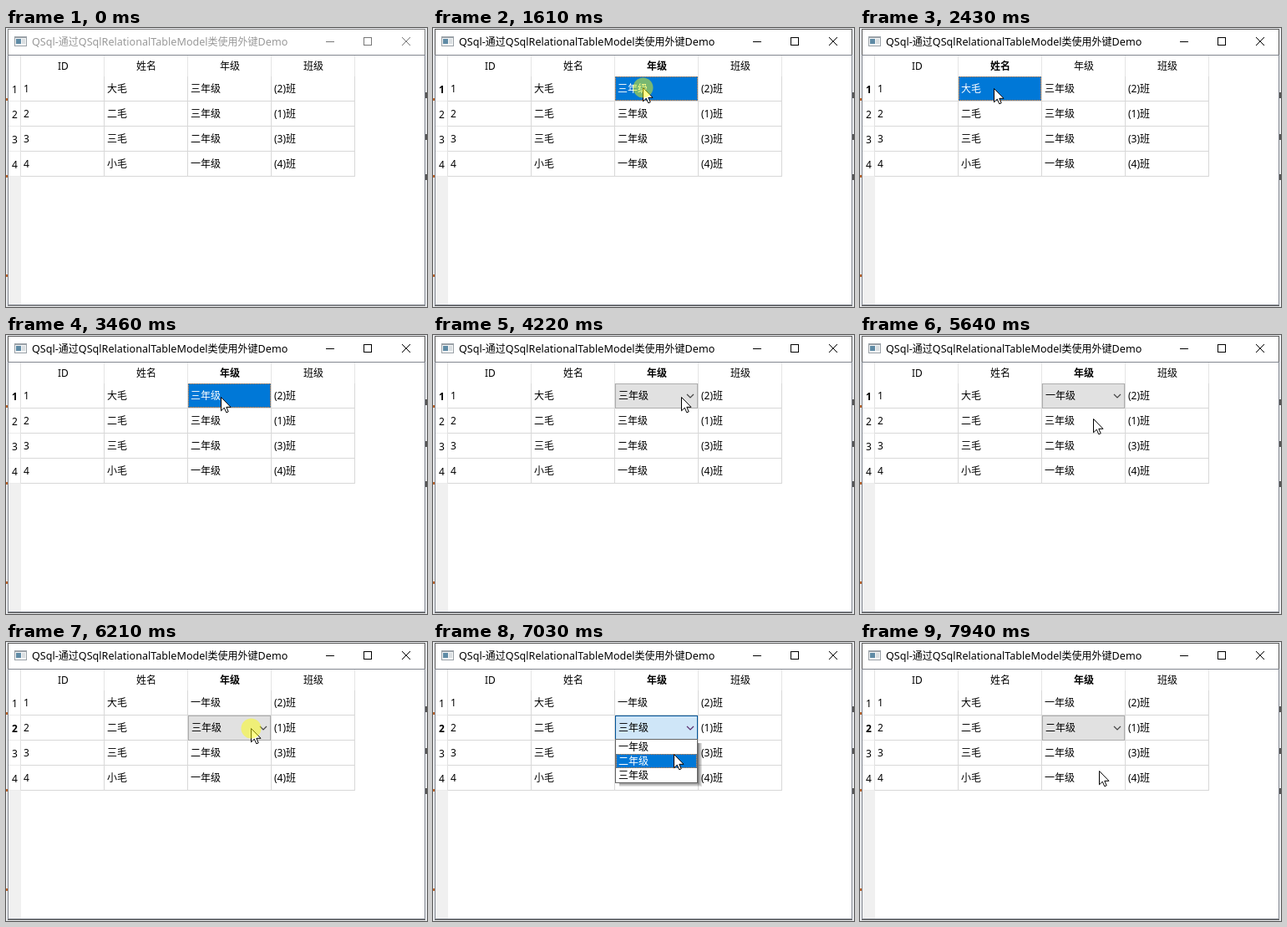
An HTML page with a canvas that plays this animation: 504x334 px, repeating every 8 s.

```html
<!DOCTYPE html>
<html lang="zh">
<head>
<meta charset="utf-8">
<style>
html, body { margin: 0; width: 100%; height: 100%; overflow: hidden; background: #fff; }
canvas { display: block; }
</style>
</head>
<body>
<canvas id="stage" width="504" height="334"></canvas>
<script>
const ctx = document.getElementById('stage').getContext('2d');
const LOOP = 8000, STEP = 1000 / 15, HOLD = 100;
const ENTER = 510;
const BLUE = '#0078d7', FOCUS = '#ff8728';
const COL = 100, ROW = 30, ITEM = 17, LEFT = 18, TOP = 58;
const GRADES = ['一年级', '二年级', '三年级'];
const HEADS = ['ID', '姓名', '年级', '班级'];
const NAMES = ['大毛', '二毛', '三毛', '小毛'];
const CLASSES = ['(2)班', '(1)班', '(3)班', '(4)班'];

// When each mouse press begins
const press = {
  activate: 1540, name: 2200, grade: 3180,
  first1: 3660, second1: 3820, list1: 4250, pick1: 5430,
  first2: 5750, second2: 5900, list2: 6190, pick2: 7170
};

// Pointer glides: start, end, then where it arrives
const glides = [
  [ENTER, 1050, 186, 112], [1050, press.activate, 251, 71],
  [1700, 2100, 160, 72], [2750, 3170, 257, 74],
  [3920, 4230, 298, 74], [4480, 4850, 289, 114], [5110, 5250, 284, 98],
  [5500, 5740, 272, 103], [5990, 6180, 293, 103],
  [6340, 6950, 288, 134], [7240, 7900, 286, 154]
];

const within = (t, a, b) => t >= a && t < b;
const ease = k => k * k * (3 - 2 * k);

function pointerAt(t) {
  let x = 361, y = 326;
  for (const [start, end, toX, toY] of glides) {
    if (t < start) break;
    const k = ease(Math.min(1, (t - start) / (end - start)));
    x += (toX - x) * k;
    y += (toY - y) * k;
  }
  return [Math.round(x), Math.round(y)];
}

function box(x, y, w, h, fill) {
  ctx.fillStyle = fill;
  ctx.fillRect(x, y, w, h);
}

function frame(x, y, w, h, color, dash = []) {
  ctx.strokeStyle = color;
  ctx.lineWidth = 1;
  ctx.setLineDash(dash);
  ctx.lineDashOffset = 0.5;
  ctx.strokeRect(x + 0.5, y + 0.5, w - 1, h - 1);
  ctx.setLineDash([]);
}

function selection(x, y, w, h) {
  box(x, y, w, h, BLUE);
  frame(x, y, w, h, FOCUS, [1, 1]);
}

function lines(color, width, ...points) {
  ctx.strokeStyle = color;
  ctx.lineWidth = width;
  ctx.beginPath();
  points.forEach(([x, y]) => ctx.lineTo(x, y));
  ctx.stroke();
}

// Latin runs may be set in another size than the Chinese ones
function text(s, x, y, { color = '#000', bold = false, center = false, latin = 12 } = {}) {
  const weight = bold ? 'bold ' : '';
  const runs = s.match(/[\x00-\x7f]+|[^\x00-\x7f]+/g).map(str => {
    const font = str.charCodeAt(0) < 128
      ? `${weight}${latin}px "Noto Sans", sans-serif`
      : `${weight}12px "Noto Sans CJK SC", "Noto Sans CJK", sans-serif`;
    ctx.font = font;
    return { str, font, w: ctx.measureText(str).width };
  });
  if (center) x = Math.round(x - runs.reduce((sum, r) => sum + r.w, 0) / 2);
  ctx.fillStyle = color;
  for (const r of runs) {
    ctx.font = r.font;
    ctx.fillText(r.str, x, y);
    x += r.w;
  }
}

function drawWindow(active) {
  box(0, 0, 504, 334, '#e9ebee');
  for (const y of [84, 176, 295]) box(0, y, 2, 3, '#b8622a');
  for (const y of [77, 127, 175]) box(502, y, 2, 7, '#555');
  box(2, 1, 500, 332, '#fff');
  frame(2, 1, 500, 332, active ? '#5a5a5a' : '#858585');

  box(10, 10, 15, 12, '#9aa1a7');
  box(11, 12, 13, 9, '#f4f6f7');
  box(12, 13, 6, 6, '#5f8ba5');
  box(19, 13, 4, 6, '#d9dee1');

  text('QSql-通过QSqlRelationalTableModel类使用外键Demo', 31, 21,
    { color: active ? '#000' : '#999', latin: 12.6 });
  const ink = active ? '#000' : '#777';
  box(383, 16, 10, 1, ink);
  frame(428, 11, 10, 10, ink);
  lines(ink, 1, [474, 11], [484, 21]);
  lines(ink, 1, [484, 11], [474, 21]);
}

function drawTable(s) {
  frame(2, 32, 500, 300, '#828790');
  box(3, TOP + 4 * ROW, 15, 153, '#f0f0f0');
  box(17, 33, 1, 145, '#e2e2e2');
  for (let c = 0; c < 4; c++) {
    const x = LEFT + c * COL;
    box(x + 99, 33, 1, 25, '#e5e5e5');
    box(x + 99, TOP, 1, 4 * ROW, '#d8d8d8');
    text(HEADS[c], x + 50, 50, { center: true, bold: c === s.col });
  }
  for (let r = 0; r < 4; r++) {
    const y = TOP + r * ROW, id = String(r + 1);
    box(3, y + 29, 14, 1, '#ececec');
    box(LEFT, y + 29, 4 * COL, 1, '#d8d8d8');
    text(id, 10.5, y + 20, { center: true, bold: r === s.row });
    [id, NAMES[r], s.grades[r], CLASSES[r]].forEach((label, c) => {
      const x = LEFT + c * COL;
      const selected = r === s.row && c === s.col;
      if (selected && s.editing) return drawCombo(x, y, label, s.open);
      if (selected) selection(x, y, 99, 29);
      text(label, x + 3, y + 19, { color: selected ? '#fff' : '#000' });
    });
  }
}

function drawCombo(x, y, label, open) {
  box(x, y, 99, 30, open ? '#cfe6f8' : '#e1e1e1');
  frame(x, y, 99, 30, open ? '#005499' : '#adadad');
  text(label, x + 4, y + 19);
  lines(open ? '#5b2d6e' : '#444', 1.2, [x + 86, y + 13], [x + 90, y + 17], [x + 94, y + 13]);
}

function drawPopup(row, pointerY) {
  const x = LEFT + 2 * COL, y = TOP + 28 + row * ROW, h = 3 * ITEM + 2;
  for (let i = 0; i < 5; i++) box(x + 5, y + 5, 95 + i, h - 5 + i, 'rgba(0,0,0,.11)');
  box(x, y, 99, h, '#fff');
  frame(x, y, 99, h, '#646464');
  const hover = pointerY > y ? Math.min(2, Math.floor((pointerY - y - 1) / ITEM)) : 2;
  GRADES.forEach((grade, i) => {
    const top = y + 1 + i * ITEM, on = i === hover;
    if (on) selection(x + 1, top, 97, ITEM);
    text(grade, x + 4, top + 13, { color: on ? '#fff' : '#000' });
  });
}

const arrow = new Path2D('M.5 .5V16.8L4.3 13.2 6.8 18.8 9.2 17.8 6.8 12.3H12Z');

function drawPointer(x, y, pressed) {
  ctx.save();
  ctx.translate(x, y);
  ctx.lineWidth = 1;
  ctx.fillStyle = '#fff';
  ctx.strokeStyle = '#000';
  ctx.fill(arrow);
  ctx.stroke(arrow);
  if (pressed) {
    ctx.fillStyle = 'rgba(255,255,0,.47)';
    ctx.beginPath();
    ctx.arc(0.5, 0.5, 12, 0, 7);
    ctx.fill();
  }
  ctx.restore();
}

function draw(now) {
  const t = Math.floor(now % LOOP / STEP) * STEP;
  const p = press;
  const active = t >= p.activate;
  const picked = [t >= p.pick1 + HOLD, t >= p.pick2 + HOLD];
  const state = {
    row: !active ? -1 : t < p.first2 ? 0 : 1,
    col: !active ? -1 : within(t, p.name, p.grade) ? 1 : 2,
    editing: within(t, p.second1 + HOLD, p.first2) || t >= p.second2 + HOLD,
    open: within(t, p.list1 + HOLD, p.pick1 + HOLD) || within(t, p.list2 + HOLD, p.pick2 + HOLD),
    grades: [GRADES[picked[0] ? 0 : 2], GRADES[picked[1] ? 1 : 2], GRADES[1], GRADES[0]]
  };
  drawWindow(active);
  drawTable(state);
  if (t < ENTER) return;
  const [x, y] = pointerAt(t);
  if (state.open) drawPopup(state.row, y);
  drawPointer(x, y, Object.values(p).some(start => within(t, start, start + HOLD)));
}

const begin = performance.now();
(function tick() {
  draw(performance.now() - begin);
  requestAnimationFrame(tick);
})();
</script>
</body>
</html>
```
